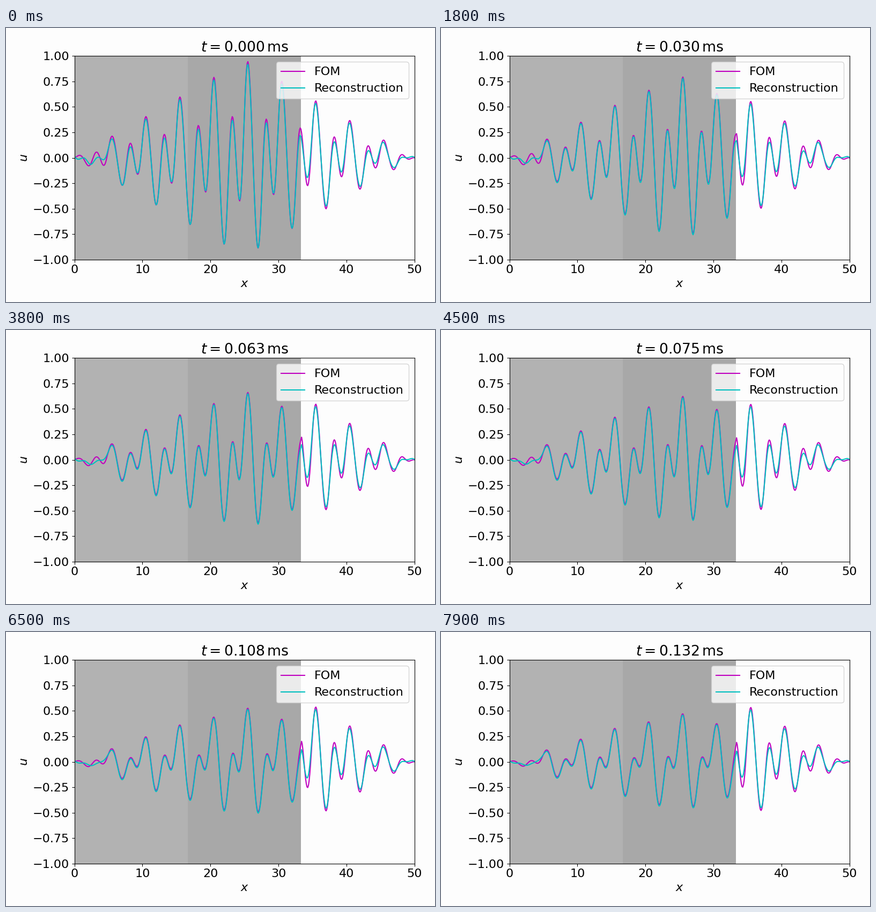
A matplotlib script that plays this animation: 800 px wide and 512 px high, repeating every 8000 ms.

```python
import numpy as np
import matplotlib.pyplot as plt
from matplotlib.animation import FuncAnimation

W, H, DPI = 800, 512, 100
FRAMES, INTERVAL = 80, 100
DT = 1 / 600  # model time per frame
LENGTH = 50
EDGES = LENGTH / 3, 2 * LENGTH / 3
DIFFUSIVITY = 1.05, 1.25, 0.075

x = np.linspace(0, LENGTH, 501)
angle = 2 * np.pi * x / 5


def initial_state():
    tent = 1 - abs(2 * x / LENGTH - 1)
    wave = (0.405 * np.cos(angle) + 0.672 * np.sin(2 * angle)
            + 0.047 * np.cos(3 * angle) + 0.02 * np.sin(4 * angle))
    return tent * wave


def solve():
    """Crank-Nicolson solution of u_t = k(x) u_xx with fixed ends."""
    n, substeps = len(x), 4
    k = np.array(DIFFUSIVITY)[np.searchsorted(EDGES, x)]
    k[[0, -1]] = 0
    lap = np.eye(n, k=1) - 2 * np.eye(n) + np.eye(n, k=-1)
    half = DT / substeps / 2 * k[:, None] * lap / (x[1] - x[0]) ** 2
    step = np.linalg.solve(np.eye(n) - half, np.eye(n) + half)
    step = np.linalg.matrix_power(step, substeps)
    states = [initial_state()]
    while len(states) < FRAMES:
        states.append(step @ states[-1])
    return states


def ramp(edge):
    return 1 / (1 + np.exp(-(x - edge) / 0.3))


def reconstruct(u, t):
    """Flatten the fine ripple, mostly near the ends and in the slow region."""
    left, right = 1 - ramp(5), ramp(EDGES[1])
    middle = 1 - left - right
    taper = np.clip((52 - x) / 7, 0, 1)
    size = (0.05 * np.exp(-t / 0.2) * left + 0.02 * np.exp(-t / 0.01) * middle
            + 0.04 * taper * right)
    ripple = np.sin(2 * angle) - 0.35 * np.cos(angle)
    d = (x - EDGES[1] - 0.55) / 0.5
    kink = (0.06 + 0.3 * t) * d * np.exp(-d * d / 2)
    return u - size * ripple - 0.012 * middle + kink


plt.rcParams.update({"font.family": "DejaVu Sans", "font.size": 16,
                     "mathtext.fontset": "dejavusans",
                     "figure.facecolor": "#fdfdfd",
                     "axes.facecolor": "#fdfdfd"})
fig, ax = plt.subplots(figsize=(W / DPI, H / DPI), dpi=DPI)
ax.axvspan(0, EDGES[0], facecolor="#b2b2b2", lw=0)
ax.axvspan(EDGES[0], EDGES[1], facecolor="#a8a8a8", lw=0)

states = solve()
full, = ax.plot(x, states[0], "m", label="FOM")
recon, = ax.plot(x, reconstruct(states[0], 0), "c", label="Reconstruction")
ax.set(xlim=(0, LENGTH), ylim=(-1, 1), xlabel="$x$", ylabel="$u$",
       yticks=np.linspace(-1, 1, 9))
ax.legend(loc="upper right")
title = ax.set_title("")


def update(i):
    t = i * DT
    full.set_ydata(states[i])
    recon.set_ydata(reconstruct(states[i], t))
    title.set_text(rf"$t = {t:.3f}\,\mathrm{{ms}}$")
    return full, recon, title


update(0)
fig.tight_layout()
anim = FuncAnimation(fig, update, frames=FRAMES, interval=INTERVAL,
                     repeat=True, repeat_delay=0)
plt.show()
```
